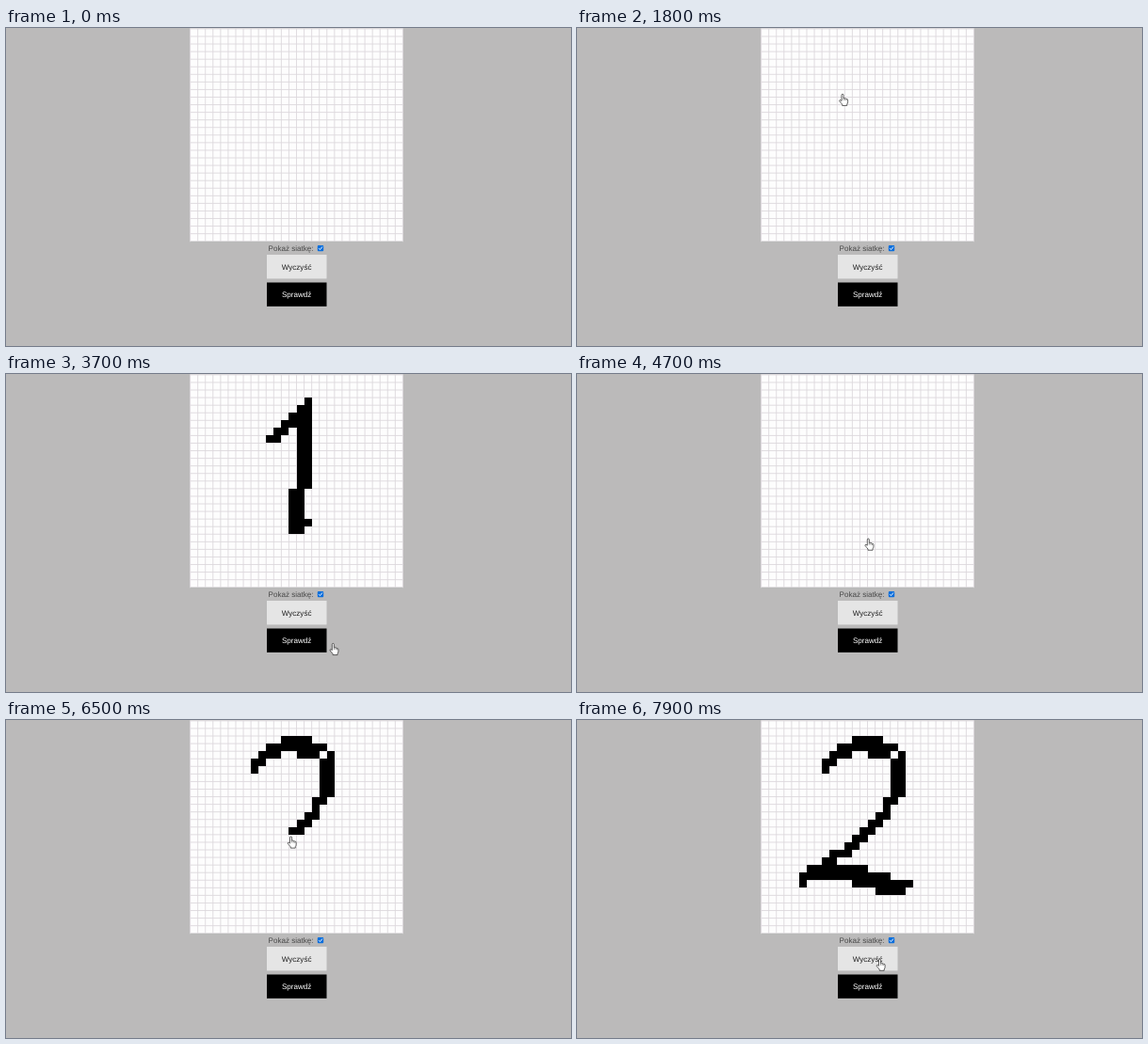
Write an HTML page that moves like this. It is 600 px wide and 338 px high and loops after 8 s.

```html
<!DOCTYPE html>
<html lang="pl">
<head>
<meta charset="utf-8">
<title>Rysowanie cyfr</title>
<style>
  html, body { margin: 0; width: 100%; height: 100%; overflow: hidden; background: #bbbaba; }
  svg { display: block; width: 100%; height: 100%; }
  text {
    font: 8.07px "Liberation Sans", Arial, sans-serif;
    text-anchor: middle;
    text-rendering: geometricPrecision;
  }
  #ink { shape-rendering: crispEdges; }
</style>
</head>
<body>
<svg viewBox="0 0 600 338">
  <rect x="195.5" y=".5" width="226" height="227" fill="#fdfdfd"/>
  <path id="grid" fill="none" stroke="#ddd8dd" stroke-width=".9"/>
  <path d="M195.5 227.4H421.5" stroke="#a5a8a5" stroke-width=".7"/>
  <path id="ink"/>

  <text x="302.5" y="237.1" fill="#484848">Pokaż siatkę:</text>
  <rect x="330.8" y="231" width="6.4" height="6.2" rx="1" fill="#0b6fdc"/>
  <path d="M332.2 234.2l1.3 1.4 2.4-3.1" fill="none" stroke="#fff" stroke-width=".9"/>

  <rect x="277" y="241" width="63.5" height="25.4" fill="#e5e5e5"/>
  <text x="308.6" y="256.5" fill="#222">Wyczyść</text>
  <rect x="277" y="270.5" width="63.5" height="25.4"/>
  <text x="308.6" y="285.6" fill="#fff">Sprawdź</text>

  <g id="hand" fill="#fff" stroke="#3a3a3a" stroke-width=".8" stroke-linejoin="round">
    <g transform="translate(1.2 6)">
      <path d="M-2.1 1.2V-5a1 1 0 0 1 2 0V-1.6Q.9-2.3 1.6-1.3Q2.5-1.9 3.1-.8Q4.5-1 4.5.4V2.4Q4.4 4 3.6 4.8V6.2H-1.4V5Q-2.6 3.6-4.4 1.4Q-4.6.2-3.4.3Z"/>
      <path d="M-.1-1.6V.6M1.6-1.3V.8M3.1-.8V1" stroke-width=".5"/>
    </g>
  </g>
</svg>
<script>
const LOOP = 8000, STEP = 100, CLEARED = 4600;
const LEFT = 195.6, TOP = 0.9, PITCH = 8.065, COUNT = 28;
const BRUSH = 0.72, INK_LAG = 30;
const byId = id => document.getElementById(id);
const pageX = col => LEFT + col * PITCH;
const pageY = row => TOP + row * PITCH;

const linear = k => k;
const easeOut = k => 1 - (1 - k) ** 3;

// Everything moves in grid units; each move starts where the last one ended.
const moves = [];
let tip = { x: -20.6, y: 31.2 };
function move(start, end, steps, ease = linear) {
  const path = document.createElementNS('http://www.w3.org/2000/svg', 'path');
  path.setAttribute('d', `M${tip.x} ${tip.y}${steps}`);
  const length = path.getTotalLength();
  tip = path.getPointAtLength(length);
  const item = { path, length, start, end, ease };
  moves.push(item);
  return item;
}

// A stroke inks every cell whose centre comes within the brush radius.
const inked = [];
function stroke(start, end, hide, steps) {
  const { path, length } = move(start, end, steps);
  const seen = new Set();
  for (let s = 0; s <= length; s += 0.1) {
    const { x, y } = path.getPointAtLength(s);
    const show = start + (end - start) * s / length + INK_LAG;
    for (let col = Math.floor(x) - 1; col <= x + 1; col++) {
      for (let row = Math.floor(y) - 1; row <= y + 1; row++) {
        const key = `${col},${row}`;
        if (seen.has(key) || Math.hypot(col + 0.5 - x, row + 0.5 - y) > BRUSH) continue;
        seen.add(key);
        inked.push({ col, row, show, hide });
      }
    }
  }
}

move(500, 1800, 'L12.8 4.1L10.7 8.6', easeOut);
stroke(1850, 3000, CLEARED,
  'L15.6 3.8L15 5V14.5L14 15.5V18.5L13.5 19.4L14 20.5L15.5 19.5');
move(3000, 3700, 'L18.8 35.4');
move(3700, 4000, 'Q31 37.4 24.3 37.7');
move(4100, CLEARED, 'L14.3 31');
move(CLEARED, 5500, 'L13.7 4.8L8.5 6.3', easeOut);
stroke(5630, 7490, LOOP,
  'L9.5 5L11 4L13 3L15 2.9L14.6 4H16.3L17.5 3.3' +
  'M18.5 4.5L18 5.5V9.5L17 10.5L16.4 11.5L16 12.5L12 16.5L9 18.5' +
  'L7 20L5.5 21.4L7 20H13.4L12.6 21H16.3L16 22H18.3L19.5 21.5');
move(7490, 7900, 'L18.5 24.7L15.6 31.4');

function tipAt(t) {
  const { path, length, start, end, ease } = moves.findLast(m => m.start <= t) || moves[0];
  const k = Math.min(1, Math.max(0, (t - start) / (end - start)));
  return path.getPointAtLength(length * ease(k));
}

let lines = '';
for (let i = 0; i <= COUNT; i++) {
  lines += `M${pageX(i)} ${TOP}V${pageY(COUNT)}M${LEFT} ${pageY(i)}H${pageX(COUNT)}`;
}
byId('grid').setAttribute('d', lines);

function draw(now) {
  const t = Math.floor(now % LOOP / STEP) * STEP;
  const ink = inked
    .filter(cell => t >= cell.show && t < cell.hide)
    .map(({ col, row }) => `M${pageX(col)} ${pageY(row)}h${PITCH}v${PITCH}h${-PITCH}z`);
  byId('ink').setAttribute('d', ink.join(''));

  const { x, y } = tipAt(t);
  const hand = byId('hand');
  hand.setAttribute('visibility', t >= moves[0].start ? 'visible' : 'hidden');
  hand.setAttribute('transform', `translate(${pageX(x)} ${pageY(y)})`);
}

const origin = performance.now();
function tick() {
  draw(performance.now() - origin);
  requestAnimationFrame(tick);
}
tick();
</script>
</body>
</html>
```
